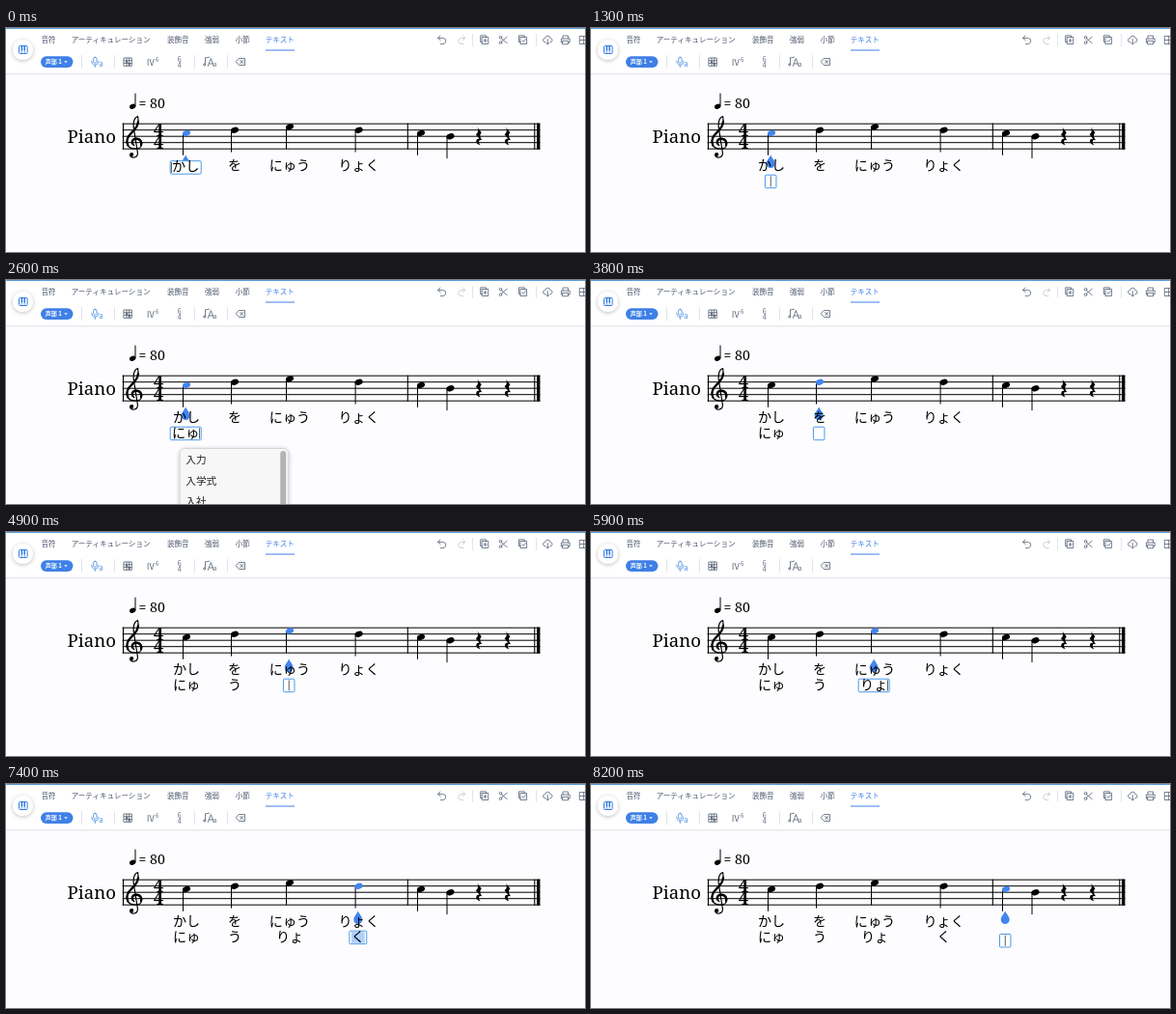
These frames come from a looping animation (600 px wide and 232 px high, 8300 ms). An HTML page:

```html
<!DOCTYPE html>
<html lang="ja">
<head>
<meta charset="utf-8">
<title>Lyrics input</title>
<style>
html, body { margin: 0; width: 100%; height: 100%; overflow: hidden; background: #fdfcfe; }
svg { display: block; }
text { font-family: "Noto Sans CJK JP", "Noto Sans CJK", sans-serif; }
.menu { font-size: 7.55px; font-weight: 500; fill: #4b566b; }
.serif { font-family: "Noto Serif", serif; }
.meter { font: 900 18.3px "Noto Serif", serif; text-anchor: middle; }
.lyric { font-size: 14.1px; font-weight: 500; text-anchor: middle; }
.latin { font: 14px "Noto Serif", serif; text-anchor: middle; }
.item { font-size: 10.7px; font-weight: 500; fill: #222; }
.icon { fill: none; stroke: #5d687c; stroke-width: .85; stroke-linecap: round; stroke-linejoin: round; }
.blue { fill: #3f80e6; }
.line { fill: none; stroke: #000; stroke-linecap: round; }
</style>
</head>
<body>
<svg width="600" height="232" viewBox="0 0 600 232">
  <defs>
    <filter id="soft" x="-30%" y="-30%" width="160%" height="160%">
      <feDropShadow dx="0" dy="1" stdDeviation="2" flood-opacity=".28"/>
    </filter>
    <path id="rest" d="M488.3 102.7L492.7 108.2Q489.6 111.3 493.3 116.2Q489.3 115.2 490.3 119.2Q490.7 120.6 491.8 121.6Q487.2 120.2 487.2 117.2Q487.4 114.4 490.6 114.8L486.9 110.3Q490.6 107 488.3 102.7Z"/>
  </defs>

  <g id="toolbar">
    <rect width="600" height="47" fill="#fff"/>
    <rect width="600" height="1" fill="#5b9dd6"/>
    <rect y="47" width="600" height="1" fill="#e6e9f0"/>
    <rect y="48" width="600" height="1" fill="#f5f6fa"/>
    <g class="menu">
      <text x="36.5" y="15.3">音符</text>
      <text x="67.7" y="15.3">アーティキュレーション</text>
      <text x="167" y="15.3">装飾音</text>
      <text x="206" y="15.3">強弱</text>
      <text x="237.7" y="15.3">小節</text>
      <text x="268.8" y="15.3" class="blue">テキスト</text>
    </g>
    <rect x="269" y="22.5" width="30" height="1" class="blue"/>

    <circle cx="17.5" cy="22.5" r="10.5" fill="#fff" filter="url(#soft)"/>
    <rect x="13.5" y="18.5" width="8.6" height="8" rx="1" fill="#fff" stroke="#2f7be0"/>
    <path d="M16.4 18.5v5M19.2 18.5v5" stroke="#2f7be0" stroke-width="1.5"/>
    <path d="M16.4 23v3.5M19.2 23v3.5" stroke="#2f7be0" stroke-width=".6"/>

    <rect x="36" y="29.3" width="33.5" height="11.6" rx="5.8" class="blue"/>
    <text x="40.7" y="37.3" font-size="6.1" font-weight="700" fill="#fff">声部 1</text>
    <path d="M60.3 34.2h3.4l-1.7 2z" fill="#fff"/>

    <path d="M78.5 28v14M112.5 28v14M195.5 28v14M229.5 28v14M483.5 6v13M549.5 6v13" stroke="#e1e5ec" fill="none"/>
    <g class="icon" style="stroke:#4a90e2">
      <rect x="90.6" y="30.3" width="3.4" height="6" rx="1.7"/>
      <path d="M88.8 34.2q0 4 3.5 4t3.5-4M92.3 38.2v2.3"/>
    </g>
    <text x="96.2" y="40" font-size="7.5" fill="#4a90e2">a</text>
    <g class="icon">
      <path d="M122.3 31h8v8.3h-8zM125 31v8.3M127.7 31v8.3M122.3 33.7h8M122.3 36.5h8"/>
      <circle cx="125" cy="35" r=".8" fill="#5d687c"/>
      <circle cx="127.7" cy="37.6" r=".8" fill="#5d687c"/>
      <path d="M206.5 31v6.5M206.5 31l4-.8M209.3 39.5l3-8 3 8M210.3 37h4"/>
      <circle cx="205.6" cy="38" r="1"/>
      <path d="M241.5 31.5h6v7h-6l-3-3.5zM242.7 33.4l3 3.2M245.7 33.4l-3 3.2"/>
    </g>
    <g fill="#5d687c">
      <text x="145.8" y="38.6" font-size="9.3">IV</text>
      <text x="155" y="35" font-size="6">6</text>
      <text x="177.7" y="34.6" font-size="7" font-weight="500">6</text>
      <text x="177.7" y="41" font-size="7" font-weight="500">4</text>
      <text x="214.7" y="39.5" font-size="6.5">a</text>
    </g>
    <g class="icon">
      <path d="M450 8l-2.5 2.4 2.7 2.2M447.8 10.4h5q3.4.5 3 3.4-.5 2.8-3.5 2.8h-2"/>
      <path stroke="#c3c9d3" d="M473.4 8l2.4 2.4-2.6 2.2M475.5 10.4h-4q-3 .5-2.7 3.4.5 2.8 3.3 2.8h2"/>
      <path d="M493.5 9.5h6.3v7h-6.3zM493.5 14.5h-1.8v-6.7h5.8v1.7M496.6 11.4v3.2M495 13h3.2"/>
      <path d="M513.3 10.7l6 5M513.3 14.2l6-5"/>
      <circle cx="512.5" cy="9.7" r="1.3"/>
      <circle cx="512.5" cy="15.2" r="1.3"/>
      <path d="M533.3 9.5h6.3v7h-6.3zM533.3 14.5h-1.8v-6.7h5.8v1.7M534.8 13l1.4 1.4 2.2-2.8"/>
      <path d="M558.6 14.8q-2.4-.5-2-2.6.4-1.6 2-1.6.6-2.6 3-2.4 2.1.2 2.5 2.4 2.2.3 2 2.2-.3 1.8-2 2M561.3 11.5v5.4M559.8 15.4l1.5 1.6 1.5-1.6"/>
      <path d="M577 11v-3h5.5v3M577 15h-1.6v-4h8.8v4h-1.7M577 13.3h5.5v3.5h-5.5z"/>
      <path d="M594.7 8.5h8v8h-8zM594.7 12.5h8M598.7 8.5v8"/>
    </g>
  </g>

  <g id="score">
    <text class="serif" x="63.5" y="119" font-size="18.6">Piano</text>
    <text class="serif" x="137.6" y="83" font-size="14">= 80</text>
    <ellipse cx="131.2" cy="81.3" rx="3.3" ry="2.4" transform="rotate(-25 131.2 81.3)"/>
    <path class="line" d="M134 80.5V68"/>
    <path class="line" d="M121 99.2H553M121 105.7H553M121 112.2H553M121 118.7H553M121 125.2H553"/>
    <path class="line" d="M121.5 99V125.3M416.3 99V125.3M547.8 99V125.3" stroke-width="1.1"/>
    <rect x="550" y="98.7" width="3.4" height="27"/>
    <path class="line" stroke-width="1.2" d="M132.8 121.8C129.5 119.5 130.5 114.2 135.3 114.2C142.5 114.2 142.8 125.2 134.4 125.2C124.5 125.2 122.5 116 129 109.5C136.5 103 138.3 97.5 136.6 91.7C132.2 93 131.4 99.5 132.6 105.3L136.4 129C136.8 135 129.8 135.5 128.6 131.5"/>
    <path class="line" stroke-width="2.3" d="M126.3 121.5C124.3 117.5 126 112.3 130 108.6C134.5 104.6 136.7 101.2 137 97M131 119.5C130 116.3 132.2 114.8 135.3 114.8C139 114.8 141 118 140 121.2"/>
    <circle cx="130.2" cy="131" r="2.1"/>
    <text class="meter" x="158.2" y="112.2">4</text>
    <text class="meter" x="158.2" y="125.3">4</text>
    <use href="#rest"/>
    <use href="#rest" x="29.7"/>
  </g>
  <g id="live"></g>
</svg>
<script>
const LOOP = 8300, BLUE = '#4285ee';
const live = document.getElementById('live');

// Note head centre and the syllables of both verses
const notes = [
  { x: 187, y: 108.9, words: ['かし', 'にゅ'] },
  { x: 237, y: 105.7, words: ['を', 'う'] },
  { x: 294, y: 102.4, words: ['にゅう', 'りょ'] },
  { x: 365.6, y: 105.7, words: ['りょく', 'く'] },
  { x: 430, y: 108.9, words: ['', ''] },
  { x: 460.5, y: 112.2, words: ['', ''] }
];

const menuNi = ['入力', '入学式', '入社'], menuRyo = ['料理', '旅行中', '両方'];

// Start time, note, verse, typed text, mode (caret, off, mark), suggestions
const steps = [
  [0, 0, 0, 'かし', 'start'],
  [800, 0, 0, 'かし', 'off'],
  [1300, 0, 1, '', 'caret'],
  [1800, 0, 1, '', 'off'],
  [2000, 0, 1, 'n', 'caret'],
  [2300, 0, 1, 'に', 'caret'],
  [2400, 0, 1, 'にy', 'caret', menuNi],
  [2500, 0, 1, 'にゅ', 'caret', menuNi],
  [2900, 0, 1, 'にゅ', 'mark'],
  [3300, 1, 1, '', 'caret'],
  [3800, 1, 1, '', 'off'],
  [4200, 1, 1, 'う', 'caret'],
  [4400, 1, 1, 'う', 'mark'],
  [4600, 2, 1, '', 'caret'],
  [5100, 2, 1, '', 'off'],
  [5400, 2, 1, 'r', 'caret'],
  [5500, 2, 1, 'り', 'caret'],
  [5800, 2, 1, 'りy', 'caret'],
  [5900, 2, 1, 'りょ', 'caret'],
  [6000, 2, 1, 'りょ', 'caret', menuRyo],
  [6300, 2, 1, 'りょ', 'mark'],
  [6600, 3, 1, '', 'caret'],
  [6900, 3, 1, 'k', 'caret'],
  [7000, 3, 1, 'く', 'caret'],
  [7200, 3, 1, 'く', 'mark'],
  [7600, 4, 1, '', 'caret']
];

const label = (s, x, y, cls = 'lyric') => `<text class="${cls}" x="${x}" y="${y}">${s}</text>`;
const rect = (x, y, w, h, more) => `<rect x="${x}" y="${y}" width="${w}" height="${h}" ${more}/>`;

function noteShape({ x, y }, active) {
  return `<path class="line" d="M${x - 3.5} ${y + 1}V${y + 22.5}"/>
    <ellipse cx="${x}" cy="${y}" rx="4.2" ry="2.9" transform="rotate(-22 ${x} ${y})" fill="${active ? BLUE : '#000'}"/>`;
}

function marker(x) {
  return `<path fill="${BLUE}" d="M${x} 131.5C${x + 1.5} 135 ${x + 4.5} 137.5 ${x + 4.5} 140.5A4.5 4.5 0 0 1 ${x - 4.5} 140.5C${x - 4.5} 137.5 ${x - 1.5} 135 ${x} 131.5Z"/>`;
}

function editBox(x, top, text, mode) {
  const size = [...text].reduce((sum, c) => sum + (c < '~' ? 8.5 : 14.1), 0);
  const w = Math.max(11.5, size + 3.8), left = x - w / 2;
  let out = rect(left, top, w, 13.5, 'rx="1" fill="#fff" stroke="#4a9aea"');
  if (mode === 'mark') out += rect(left + 2, top + 1, w - 4, 11.5, 'fill="#aed0fa"');
  out += label(text, x, top + 10.4, /^[a-z]$/.test(text) ? 'latin' : 'lyric');
  const caretX = mode === 'start' ? left + 1.3 : text ? left + w - 1.8 : x;
  if (mode === 'caret' || mode === 'start') out += rect(caretX - .4, top + 1.2, .8, 11, 'fill="#333"');
  return out;
}

function popup(x, items) {
  return rect(x, 174.5, 112.5, 90, 'rx="5" fill="#f7f7f8" stroke="#c9c9cc" stroke-width=".7" filter="url(#soft)"')
    + rect(x + 104, 177, 6, 80, 'rx="3" fill="#b4b4b6"')
    + items.map((s, i) => label(s, x + 6, 190 + 21.6 * i, 'item')).join('');
}

function draw([, at, verse, text, mode, items]) {
  const x = notes[at].x - .8;
  let out = notes.map((n, i) => noteShape(n, i === at)).join('') + marker(x);
  notes.forEach((n, i) => {
    if (i !== at || verse) out += label(n.words[0], n.x, 147.4);
    if (i < at) out += label(n.words[1], n.x, 162.9);
  });
  const top = verse ? (at === 4 ? 155.5 : 152.2) : 137.7;
  out += editBox(x, top, text, mode);
  if (items) out += popup(x - 6, items);
  live.innerHTML = out;
}

let shown;
function tick(now) {
  const t = now % LOOP;
  const step = steps.findLast(s => s[0] <= t);
  if (step !== shown) draw(shown = step);
  requestAnimationFrame(tick);
}
draw(shown = steps[0]);
requestAnimationFrame(tick);
</script>
</body>
</html>
```
